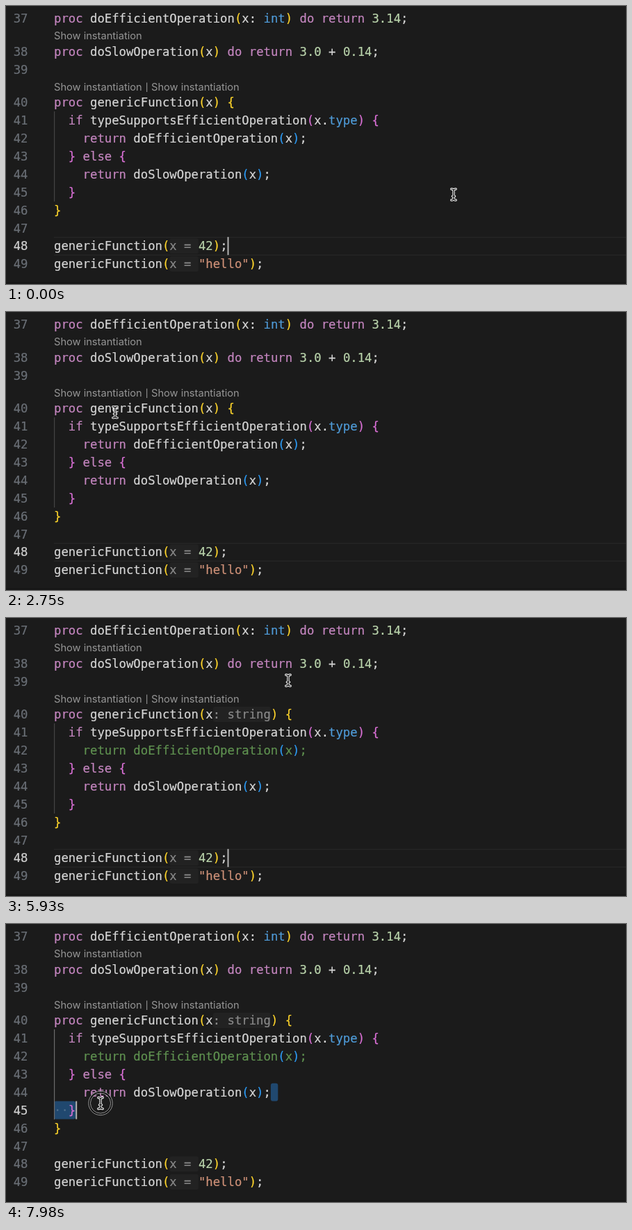
Write an HTML page that moves like this. It is 892 px wide and 401 px high and loops after 8 s.

```html
<!DOCTYPE html>
<html lang="en">
<head>
<meta charset="utf-8">
<title>Code editor</title>
<style>
html, body { margin: 0; width: 100%; height: 100%; overflow: hidden; background: #1b1b1b; }
svg { display: block; width: 892px; height: 401px; }
text { white-space: pre; }
text, tspan { fill: currentColor; }
.code { font: 17.27px "DejaVu Sans Mono", monospace; color: #d6d6d6; }
.code, .code tspan { stroke: currentColor; stroke-width: .2; }
.code.num { text-anchor: end; color: #6a6f76; }
.lens { font: 14.65px Inter, sans-serif; color: #969696; }
.k { color: #c586c0; } .t { color: #4f9bd8; } .n { color: #b9d3ab; } .s { color: #ce9178; }
.g { color: #ffd52b; } .p { color: #da70d6; } .b { color: #2d9bf5; } .h { color: #8a8a8a; }
.off { color: #5f9150; }
</style>
</head>
<body>
<svg id="stage" viewBox="0 0 892 401"></svg>
<script>
const NS = 'http://www.w3.org/2000/svg';
const stage = document.getElementById('stage');
const LOOP = 8000, X0 = 69, CW = 10.397, ROW = 25.9;

function add(tag, attrs, parent = stage) {
  const el = document.createElementNS(NS, tag);
  for (const key in attrs) el.setAttribute(key, attrs[key]);
  return parent.appendChild(el);
}
const show = (el, on) => el.setAttribute('visibility', on ? 'visible' : 'hidden');
const colX = col => X0 + col * CW;
const midY = n => n === 37 ? 18 : n < 40 ? 65.6 + (n - 38) * ROW : 139 + (n - 40) * ROW;

// Markup: «class|text» colours a run
function codeLine(n, markup) {
  const el = add('text', { class: 'code', x: X0, y: midY(n) + 6.2 });
  for (const [, cls, run, plain] of markup.matchAll(/«(\w+)\|(.*?)»|([^«]+)/g)) {
    add('tspan', cls ? { class: cls } : {}, el).textContent = run ?? plain;
  }
  return el;
}
function hintBox(n, col, len) {
  return add('rect', { x: colX(col), y: midY(n) - 11, width: len * CW, height: 22, rx: 3, fill: '#222222' });
}
function lens(x, y) {
  const el = add('text', { class: 'lens', x, y });
  el.textContent = 'Show instantiation';
  return el;
}

const lineBox = add('path', { d: 'M69-12.5H892M69 13H892', stroke: '#252525', 'stroke-width': 1.6 });
const selections = [0, 1].map(() => add('rect', { height: ROW, rx: 3, fill: '#20486f' }));
const dots = add('g', { fill: '#55748f' });
const guide = add('rect', { x: 69, y: 152, width: 1.2, height: 130 });

const numbers = {};
for (let n = 37; n <= 49; n++) {
  numbers[n] = add('text', { class: 'code num', x: 31.5, y: midY(n) + 6.2 });
  numbers[n].textContent = n;
}

const links = [lens(X0, 121.6), lens(209, 121.6)];
lens(X0, 48.2);
add('rect', { x: 202, y: 110.5, width: 1.2, height: 13.5, fill: '#8a8a8a' });

codeLine(37, '«k|proc» doEfficientOperation«g|(»x: «t|int»«g|)» «k|do return» «n|3.14»;');
codeLine(38, '«k|proc» doSlowOperation«g|(»x«g|)» «k|do return» «n|3.0» + «n|0.14»;');
const typeBox = hintBox(40, 22, 8);
const head = '«k|proc» genericFunction«g|(»x';
const generic = [
  codeLine(40, head + '«g|)» «g|{»'),
  codeLine(42, '    «k|return» doEfficientOperation«b|(»x«b|)»;')
];
const concrete = [
  typeBox,
  codeLine(40, head + '«h|: string»«g|)» «g|{»'),
  codeLine(42, '    «off|return doEfficientOperation»«b|(»«off|x»«b|)»«off|;»')
];
codeLine(41, '  «k|if» typeSupportsEfficientOperation«p|(»x.«t|type»«p|)» «p|{»');
codeLine(43, '  «p|}» «k|else» «p|{»');
codeLine(44, '    «k|return» doSlowOperation«b|(»x«b|)»;');
codeLine(45, '  «p|}»');
codeLine(46, '«g|}»');
hintBox(48, 16, 4);
hintBox(49, 16, 4);
codeLine(48, 'genericFunction«g|(»«h|x = »«n|42»«g|)»;');
codeLine(49, 'genericFunction«g|(»«h|x = »«s|"hello"»«g|)»;');

const caret = add('rect', { width: 2, height: 26, fill: '#b4b4b4' });
add('rect', { y: 398, width: 892, height: 3, fill: '#171717' });

// Pointers, drawn around their hot spot
const pointer = add('g', {});
const ring = add('g', { fill: 'none' }, pointer);
add('circle', { r: 15.8, stroke: '#0c0c0c', 'stroke-width': 2.4 }, ring);
add('circle', { r: 17.2, stroke: '#a8a8a8', 'stroke-width': .9 }, ring);
add('circle', { r: 14.6, stroke: '#a8a8a8', 'stroke-width': .9 }, ring);
const beam = add('g', { fill: 'none', 'stroke-linecap': 'round', 'stroke-linejoin': 'round' }, pointer);
const beamPath = 'M-3.2-8Q-.4-8 0-6.2Q.4-8 3.2-8M0-6.2V6.2M-3.2 8Q-.4 8 0 6.2Q.4 8 3.2 8M-1.6 2.4H1.6';
add('path', { d: beamPath, stroke: '#f2f2f2', 'stroke-width': 3.4 }, beam);
add('path', { d: beamPath, stroke: '#0a0a0a', 'stroke-width': 1.2 }, beam);
const hand = add('g', { fill: '#ffffff', stroke: '#0a0a0a', 'stroke-width': 1, 'stroke-linejoin': 'round' }, pointer);
add('path', { d: 'M-1.6 1Q-1.4-.6 0-.6T1.6 1L2.2 5Q3.8 4 4.8 5.4Q6.4 4.8 7.2 6.2Q9.2 5.8 9.3 8Q9.4 11 7.8 13V15.4H1.2V14Q-.8 12-3.8 8.4Q-4.4 6.6-2.8 6.6Q-1.8 6.7-.6 8Z' }, hand);
add('path', { d: 'M2.4 9.2V12.4M4.5 9.2V12.4M6.5 9.2V12.4', fill: 'none', 'stroke-width': .8 }, hand);

// [start, end, from, control, control, to]
const line = (t0, t1, a, b) => [t0, t1, a, a.map((v, i) => v + (b[i] - v) / 3), a.map((v, i) => v + (b[i] - v) * 2 / 3), b];
const moves = [
  line(1150, 1500, [644, 272], [578, 177]),
  line(1750, 2150, [578, 177], [181, 240]),
  line(2380, 2930, [181, 240], [149, 113]),
  line(3130, 3230, [149, 113], [148.5, 112.5]),
  [4430, 5130, [148.5, 112.5], [230, 40], [480, 40], [406, 90]],
  [6080, 6880, [406, 90], [660, 95], [680, 235], [451, 237.5]],
  line(6900, 7050, [451, 237.5], [440, 243]),
  line(7530, 7980, [440, 243], [136, 258.5])
];
const PRESS = 7480, CLICK = 3580;

function pointerAt(t) {
  let move = moves[0];
  for (const m of moves) if (t >= m[0]) move = m;
  const [t0, t1, a, b, c, d] = move;
  const u = Math.min(1, Math.max(0, (t - t0) / (t1 - t0)));
  const e = u * u * (3 - 2 * u), f = 1 - e;
  return a.map((v, i) => f * f * f * v + 3 * f * f * e * b[i] + 3 * f * e * e * c[i] + e * e * e * d[i]);
}

function select(el, n, from, to) {
  show(el, to > from);
  el.setAttribute('x', colX(from));
  el.setAttribute('y', midY(n) - ROW / 2);
  el.setAttribute('width', Math.max(0, (to - from) * CW));
}

function draw(t) {
  const [x, y] = pointerAt(t);
  pointer.setAttribute('transform', `translate(${x.toFixed(2)} ${y.toFixed(2)})`);

  const over = y > 107 && y < 126 ? (x > 69 && x < 196 ? 0 : x > 209 && x < 336 ? 1 : -1) : -1;
  links.forEach((el, i) => el.style.color = i === over ? '#4295dc' : '');
  show(hand, over >= 0);
  show(beam, over < 0);

  const dragging = t >= PRESS;
  show(ring, dragging || (t >= CLICK && t < CLICK + 110));

  const done = t >= CLICK + 50;
  generic.forEach(el => show(el, !done));
  concrete.forEach(el => show(el, done));

  let row = 48, col = 24;
  if (dragging) {
    row = y < midY(44) + ROW / 2 ? 44 : 45;
    col = Math.min(row === 44 ? 30 : 3, Math.max(0, Math.round((x - X0) / CW)));
  }
  const below = row === 45;
  select(selections[0], 44, below || !dragging ? 30 : col, below ? 31 : 30);
  select(selections[1], 45, 0, below ? col : 0);

  dots.replaceChildren();
  const spaces = below ? [0, 1] : row === 44 ? [0, 1, 2, 3, 10].filter(i => i >= col) : [];
  for (const i of spaces) add('circle', { cx: colX(i + .5), cy: midY(row), r: 1.2 }, dots);

  caret.setAttribute('x', colX(col));
  caret.setAttribute('y', midY(row) - 13);
  show(caret, dragging || (t + 570) % 1000 >= 500);
  show(lineBox, !dragging || (row === 44 && col === 30));
  lineBox.setAttribute('transform', `translate(0 ${midY(row)})`);
  guide.setAttribute('fill', dragging ? '#6c6c6c' : '#444444');
  for (const n in numbers) numbers[n].style.color = +n === row ? '#d0d0d0' : '';
}

function tick() {
  draw(performance.now() % LOOP);
  requestAnimationFrame(tick);
}
tick();
</script>
</body>
</html>
```
